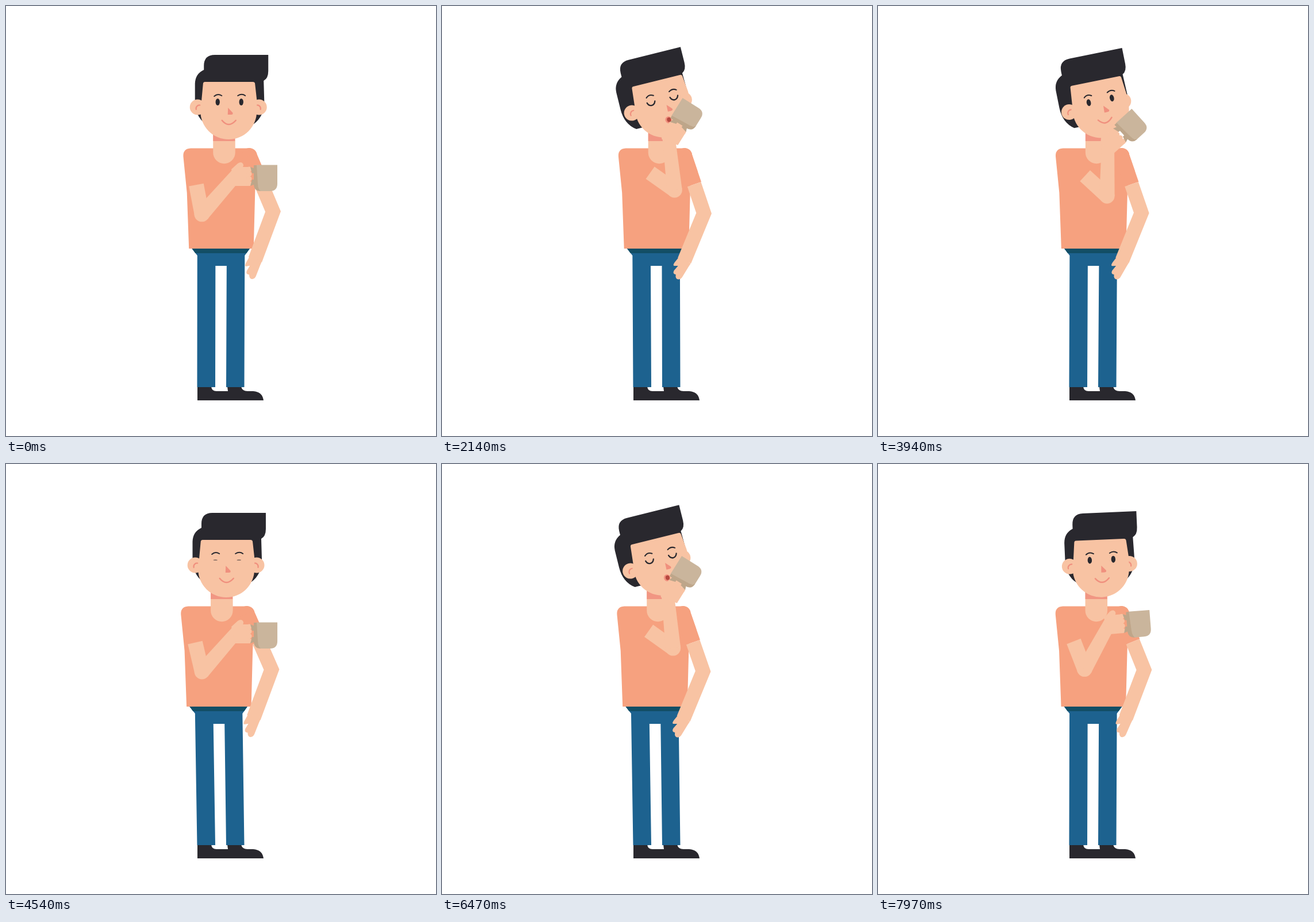
An HTML page with a canvas for the animation above (8 s loop, 748 by 748 pixels).

```html
<!DOCTYPE html>
<html lang="en">
<head>
<meta charset="utf-8">
<title>Coffee break</title>
<style>
  html, body { margin: 0; width: 100%; height: 100%; overflow: hidden; background: #fff; }
  canvas { display: block; width: 100vw; height: 100vh; }
</style>
</head>
<body>
<canvas id="stage" width="748" height="748"></canvas>
<script>
const ctx = document.getElementById('stage').getContext('2d');
const LOOP = 8000;
const SKIN = '#f8c3a3', SHIRT = '#f6a17f', PINK = '#f0907e', DARK = '#29282e',
      JEANS = '#1d628f', WAIST = '#124e66', MUG = '#cab59c', MUG_SHADE = '#bea68a';

const clamp = v => Math.min(1, Math.max(0, v));
const ease = (t, start, length) => 0.5 - 0.5 * Math.cos(Math.PI * clamp((t - start) / length));
const rad = deg => deg * Math.PI / 180;

function fill(color, path) {
  ctx.fillStyle = color;
  ctx.fill(new Path2D(path));
}

function line(color, width, path) {
  ctx.strokeStyle = color;
  ctx.lineWidth = width;
  ctx.stroke(new Path2D(path));
}

function ellipse(color, x, y, rx, ry = rx) {
  ctx.fillStyle = color;
  ctx.beginPath();
  ctx.ellipse(x, y, rx, ry, 0, 0, 2 * Math.PI);
  ctx.fill();
}

function group(draw, dx = 0, dy = 0, angle = 0, px = 0, py = 0) {
  ctx.save();
  ctx.translate(px + dx, py + dy);
  ctx.rotate(angle);
  ctx.translate(-px, -py);
  draw();
  ctx.restore();
}

// Long shut spells are sips, the short one is a blink.
const SHUT = [[1350, 3700], [4520, 4560], [5750, 7350]];

function pose(t) {
  const sip = (rise, fall, length) => ease(t, rise, length) - ease(t, fall, length);
  const gaps = SHUT.map(([a, b]) => Math.max(a - t, t - b, 0));
  return {
    sway: -1.4 - 3.5 * Math.cos(2 * Math.PI * (t - 560) / 2000),
    lift: sip(265, 3695, 910) + sip(4665, 7345, 910),
    tilt: rad(-14) * (sip(585, 3695, 870) + sip(4985, 7345, 870)),
    lids: clamp(Math.min(...gaps) / 90),
    sipping: gaps[0] === 0 || gaps[2] === 0
  };
}

function drawLegs(sway) {
  fill(DARK, 'M333 662H357Q358 670 366 670H386L385 662H409Q411 670 420 670H430Q446 671 448 686H333Z');
  ctx.save();
  ctx.transform(1, 0, -sway / 241, 1, sway * 663 / 241, 0);
  fill(JEANS, 'M324 422H425L416 434L414.5 663H383L384.5 452H365L364 663H332.5L333.5 434Z');
  fill(WAIST, 'M324 421H425L419 430H330Z');
  ctx.restore();
}

function drawTorso() {
  fill(SHIRT, 'M322 247.5H424Q434 247.5 437 256L434 325L431.5 422H319L315.5 325L309.5 265Q307 248 322 247.5Z');
  fill(SKIN, 'M361 220H399.500V255A19.250 19.250 0 0 1 361 255Z');
  fill(PINK + 'dd', 'M361 220H399V235H361Z');
}

function drawEar() {
  ellipse(SKIN, 334, 176, 13.5);
  line(PINK, 2.2, 'M331.500 180A6 6 0 0 1 338 172.500');
}

function drawEye(x, { lids, sipping }) {
  if (sipping) line(DARK, 2.3, `M${x - 7} 166Q${x - 5} 172 ${x} 172T${x + 7} 166`);
  else ellipse(DARK, x, 167, 3.7, Math.max(0.5, 6 * lids));
}

function drawHead(p) {
  const turn = p.lift;
  ctx.lineCap = 'round';
  fill(DARK, 'M329.500 165V135Q330 118 345 111V104Q345 85 364 85H457V113Q457 126 449 130L450 165Q450 192 432 205H348Q329.500 192 329.500 165Z');
  group(() => { ctx.translate(775, 0); ctx.scale(-1, 1); drawEar(); });
  group(() => fill(SKIN,
    'M347 132H430Q434 132 434 136L437 163V183A49 49 0 0 1 339 183L341 163L343.500 136Q343.500 132 347 132Z'), 14 * turn);
  group(drawEar, 13 * turn);
  group(() => {
    drawEye(369, p);
    drawEye(410, p);
    line(DARK, 2, 'M363 157Q369 151.500 376 156M404 156Q411 151.500 417 156');
  }, 15 * turn, -0.3 * turn);
  group(() => fill(PINK, 'M387 177L395 185.500Q396.500 189 392 189H386.500Z'), 22 * turn);
  group(() => {
    if (p.sipping) {
      ellipse(PINK, 388, 202, 5.5, 6);
      ellipse('#b5483f', 389, 202, 3.5, 4);
    } else line(PINK, 2.5, 'M376.500 199Q388 213 400.500 199');
  }, 18 * turn, turn);
}

function drawHangingArm(sway, lift) {
  const sx = 424 + sway, sy = 260;
  const ex = 465 - 8 * lift + 0.6 * sway, ey = 357.5 + 3 * lift;
  const wx = 434 - 11 * lift + 0.6 * sway, wy = 441 + 2 * lift;
  const cx = (sx + ex) / 2, cy = (sy + ey) / 2;
  ctx.lineCap = 'round';
  line(SHIRT, 26, `M${sx} ${sy}L${sx + (cx - sx) * 0.6} ${sy + (cy - sy) * 0.6}`);
  ctx.lineCap = 'butt';
  line(SHIRT, 26, `M${sx} ${sy}L${cx} ${cy}`);
  line(SKIN, 25, `M${cx} ${cy}L${ex} ${ey}L${wx} ${wy}`);
  group(() => fill(SKIN,
    'M-8 -8L-17 3Q-21 9 -17 9L-11 9L-18 17Q-21 23 -15 24Q-16 32 -11 32.500Q-7 33 -4 29L7 11L11 5Z'),
    wx, wy, rad(-10 * (1 - lift)));
}

function drawMugAndFist() {
  fill(SKIN, 'M392 284L403 274Q409 270 412 274Q414 277 412 280H424V313H398Z');
  for (let i = 0; i < 4; i++) ellipse(SKIN, 423, 284 + i * 8.2, 4.5);
  fill(MUG_SHADE, 'M425 280L433 283V291H428Z');
  fill(MUG_SHADE, 'M425 313L433 310V302H428Z');
  fill(MUG, 'M435.500 276.500H472V309Q472 322 459 322H442Q438 317 437.500 309Z');
  fill(MUG_SHADE, 'M431 277H436L438 309Q438.500 319 443 322Q431 322 431 309Z');
}

function drawMugArm(sway, lift) {
  const gripX = 424 + 9.6 * lift - 22.6 * lift ** 3 + 0.6 * sway * lift;
  const gripY = 296 - 85 * lift;
  const roll = rad(-58) * lift ** 1.7;
  const cos = Math.cos(roll), sin = Math.sin(roll);
  const wx = gripX - 20 * cos + 6 * sin, wy = gripY - 20 * sin - 6 * cos;

  // Two-bone reach from shoulder to wrist.
  const sx = 322 + sway, sy = 260, upper = 104, fore = 96;
  const reach = Math.hypot(wx - sx, wy - sy);
  const bend = Math.acos((upper ** 2 + reach ** 2 - fore ** 2) / (2 * upper * reach));
  const shoulder = Math.atan2(wy - sy, wx - sx) + bend;
  const ex = sx + upper * Math.cos(shoulder), ey = sy + upper * Math.sin(shoulder);
  const forearm = Math.atan2(wy - ey, wx - ex);

  ctx.lineCap = 'butt';
  line(SKIN, 26, `M${(sx + ex) / 2} ${(sy + ey) / 2}L${ex} ${ey}`);
  ellipse(SKIN, ex, ey, 13.2);
  group(() => fill(SKIN, 'M0 -13.200L92 -11V11L0 13.200Z'), ex, ey, forearm);
  group(drawMugAndFist, gripX - 424, gripY - 296, roll, 424, 296);
}

function draw(t) {
  const p = pose(t);
  ctx.fillStyle = '#fff';
  ctx.fillRect(0, 0, 748, 748);
  drawLegs(p.sway);
  group(drawTorso, p.sway);
  group(() => drawHead(p), p.sway - 6.5 * p.lift, 0, p.tilt, 384, 214);
  drawHangingArm(p.sway, p.lift);
  drawMugArm(p.sway, p.lift);
}

const begin = performance.now();
function tick() {
  draw((performance.now() - begin) % LOOP);
  requestAnimationFrame(tick);
}
tick();
</script>
</body>
</html>
```
